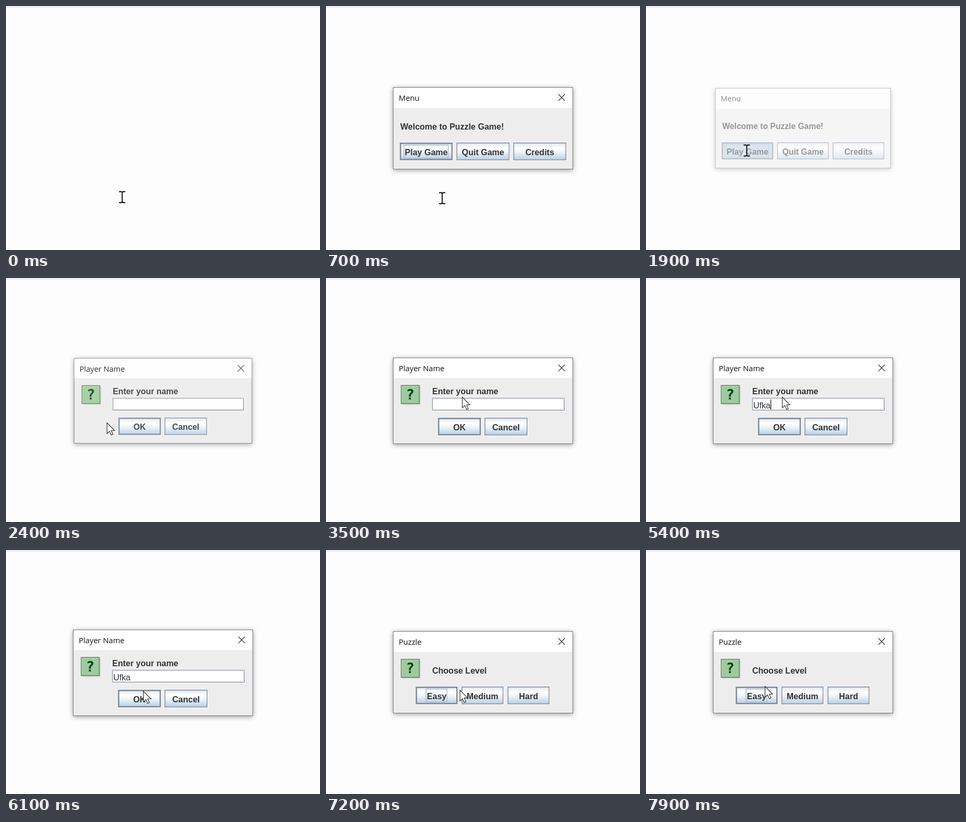
Animation of 600x466 px, one loop 8 s. Source, as an HTML page:

```html
<!DOCTYPE html>
<html lang="en">
<head>
<meta charset="utf-8">
<title>Puzzle game dialogs</title>
<style>
html, body { margin: 0; width: 100%; height: 100%; overflow: hidden; background: #fefdfe; }
svg { display: block; width: 600px; height: 466px; }
text { font: 16px "Liberation Sans", sans-serif; fill: #333; }
.bold { font-weight: bold; }
.title { font: 14.7px "Open Sans", sans-serif; fill: #111; }
.mark { font: bold 27px "DejaVu Sans Mono", monospace; fill: #053f0c; }
.middle { text-anchor: middle; }
.window { filter: drop-shadow(0 2px 5px rgba(0, 0, 0, .38)); }
</style>
</head>
<body>
<svg id="stage" viewBox="0 0 600 466">
  <defs>
    <linearGradient id="metal" x2="0" y2="1">
      <stop offset="0" stop-color="#dde8f3"/>
      <stop offset=".3" stop-color="#fff"/>
      <stop offset=".5" stop-color="#f2f6fa"/>
      <stop offset="1" stop-color="#b8cfe5"/>
    </linearGradient>
  </defs>
  <rect width="600" height="466" fill="#fefdfe"/>
  <rect width="600" height="3" fill="#e7ecf9"/>
</svg>
<script>
const stage = document.getElementById('stage');
const LOOP = 8000;
const PLAYER = 'Ufka';
const KEY_TIMES = [4250, 4500, 4900, 5200];
const FIELD_FOCUS = 2550;

function add(parent, tag, attrs, content = '') {
  const node = document.createElementNS('http://www.w3.org/2000/svg', tag);
  for (const name in attrs) node.setAttribute(name, attrs[name]);
  node.textContent = content;
  parent.append(node);
  return node;
}

const rect = (parent, x, y, width, height, attrs) =>
  add(parent, 'rect', { x, y, width, height, ...attrs });

const label = (parent, x, y, content, cls = 'bold') =>
  add(parent, 'text', { x, y, class: cls }, content);

const path = (parent, d, attrs) => add(parent, 'path', { d, fill: 'none', ...attrs });

function dialog(title, top, bottom, barHeight) {
  const root = add(stage, 'g', {});
  rect(root, 128, top, 344, bottom - top, { fill: '#777', class: 'window' });
  rect(root, 129, top + 1, 342, bottom - top - 2, { fill: '#eeedee' });
  rect(root, 129, top + 1, 342, barHeight - 1, { fill: '#fff' });
  label(root, 139, top + 26, title, 'title');
  const cross = path(root, `M444 ${top + 13.5}l12.5 12.5m0 -12.5l-12.5 12.5`,
    { stroke: '#333', 'stroke-width': 1.2 });
  return { root, cross, middle: (top + bottom) / 2 };
}

function button(parent, x, y, width, content, isDefault) {
  const line = isDefault ? 2.5 : 1.4;
  rect(parent, x + 1, y + 1, width, 33.5, { fill: '#fff' });
  const face = rect(parent, x + line / 2, y + line / 2, width - line, 33.5 - line,
    { fill: 'url(#metal)', stroke: '#7a8a99', 'stroke-width': line });
  return { face, text: label(parent, x + width / 2, y + 24, content, 'bold middle') };
}

const focusRing = (parent, x, y, width, height) =>
  rect(parent, x, y, width, height, { fill: 'none', stroke: '#a3b8cc', 'stroke-width': 1.3 });

function questionIcon(parent, y) {
  rect(parent, 146, y + 3, 35, 35, { fill: '#bbb', opacity: .45 });
  rect(parent, 143.7, y + .7, 34.6, 34.6, { fill: '#9dcb9d', stroke: '#5f7566', 'stroke-width': 1.4 });
  path(parent, `M145.2 ${y + 34}v-31.8h32`, { stroke: '#b9dfb9' });
  label(parent, 161, y + 27, '?', 'mark middle');
}

const menu = dialog('Menu', 155, 312, 40);
label(menu.root, 142, 235.5, 'Welcome to Puzzle Game!');
const play = button(menu.root, 141, 261, 101, 'Play Game', true);
focusRing(menu.root, 149, 265.5, 84.5, 25);
button(menu.root, 249.5, 261, 101, 'Quit Game');
button(menu.root, 358, 261, 101, 'Credits');

const naming = dialog('Player Name', 152, 317, 39);
questionIcon(naming.root, 204.5);
label(naming.root, 203, 221.5, 'Enter your name');
rect(naming.root, 203, 229, 254, 24.5, { fill: '#fff' });
path(naming.root, 'M203.5 253v-23.4h253', { stroke: '#8d99a5', 'stroke-width': 1.3 });
path(naming.root, 'M455.3 231v21.4h-251', { stroke: '#7a8a99', 'stroke-width': 1.4 });
const typed = label(naming.root, 205, 248.5, '', '');
const caret = rect(naming.root, 0, 232, 1.3, 19, { fill: '#222' });
const ok = button(naming.root, 214, 267, 82, 'OK', true);
button(naming.root, 303, 267, 82, 'Cancel');

const level = dialog('Puzzle', 155, 312, 40);
questionIcon(level.root, 208);
label(level.root, 203, 235.5, 'Choose Level');
button(level.root, 171.5, 261, 80, 'Easy', true);
focusRing(level.root, 191, 265.5, 40, 24.5);
button(level.root, 259, 261, 80, 'Medium');
button(level.root, 347, 261, 80, 'Hard');

const beam = path(stage,
  'M-6 -10.5h3.5q2.5 0 2.5 2v17q0 2 -2.5 2h-3.5M6 -10.5h-3.5q-2.5 0 -2.5 2v17q0 2 2.5 2h3.5',
  { stroke: '#050505', 'stroke-width': 1.8 });
const arrow = path(stage, 'M.5 .5v20.5l4.8 -4.4 3.4 7.4 3.2 -1.5 -3.3 -7.2h6.4z',
  { fill: '#fff', stroke: '#222', 'stroke-width': 1.1 });

const clamp = v => Math.max(0, Math.min(1, v));
const smooth = v => v * v * (3 - 2 * v);

// Pointer stops: time, x, y
const route = [
  [0, 222, 365], [300, 222, 365], [450, 222, 367], [850, 222, 367],
  [1450, 192.5, 276], [2650, 192.5, 276], [3200, 260, 227], [5650, 260, 227],
  [6050, 262, 269], [7050, 262, 269], [7600, 227, 260], [LOOP, 227, 260]
];

function pointerAt(t) {
  const i = route.findIndex(stop => stop[0] > t);
  const [t0, x0, y0] = route[i - 1], [t1, x1, y1] = route[i];
  const p = smooth((t - t0) / (t1 - t0));
  return [x0 + (x1 - x0) * p, y0 + (y1 - y0) * p];
}

const show = (node, visible) => node.setAttribute('visibility', visible ? 'inherit' : 'hidden');

function animateWindow({ root, cross, middle }, t, opens, closes) {
  const enter = clamp((t - opens) / 200), leave = clamp((t - closes) / 200);
  const eased = 1 - (1 - enter) ** 3;
  const scale = (.92 + .08 * eased) * (1 - .046 * leave);
  root.setAttribute('opacity', eased * (1 - leave));
  root.setAttribute('transform',
    `translate(300 ${middle}) scale(${scale}) translate(-300 ${-middle})`);
  show(root, enter > 0 && leave < 1);
  show(cross, leave === 0);
}

const press = (control, down) => control.face.setAttribute('fill', down ? '#b8cfe5' : 'url(#metal)');

function render(t) {
  animateWindow(menu, t, 280, 1800);
  animateWindow(naming, t, 2300, 6560);
  animateWindow(level, t, 6850, Infinity);
  press(play, t >= 1700);
  press(ok, t >= 6380);

  const keys = KEY_TIMES.filter(time => time <= t);
  typed.textContent = PLAYER.slice(0, keys.length);
  const lastKey = keys.length ? keys[keys.length - 1] : FIELD_FOCUS;
  caret.setAttribute('x', 205 + (keys.length ? typed.getComputedTextLength() : 0));
  show(caret, t >= FIELD_FOCUS && t < 6380 && Math.floor((t - lastKey) / 500) % 2 === 0);

  const overDialog = t >= 2400;
  const place = `translate(${pointerAt(t).join(' ')})`;
  beam.setAttribute('transform', place);
  arrow.setAttribute('transform', place);
  show(beam, !overDialog);
  show(arrow, overDialog);
}

const start = performance.now();
function tick() {
  render((performance.now() - start) % LOOP);
  requestAnimationFrame(tick);
}
tick();
</script>
</body>
</html>
```
